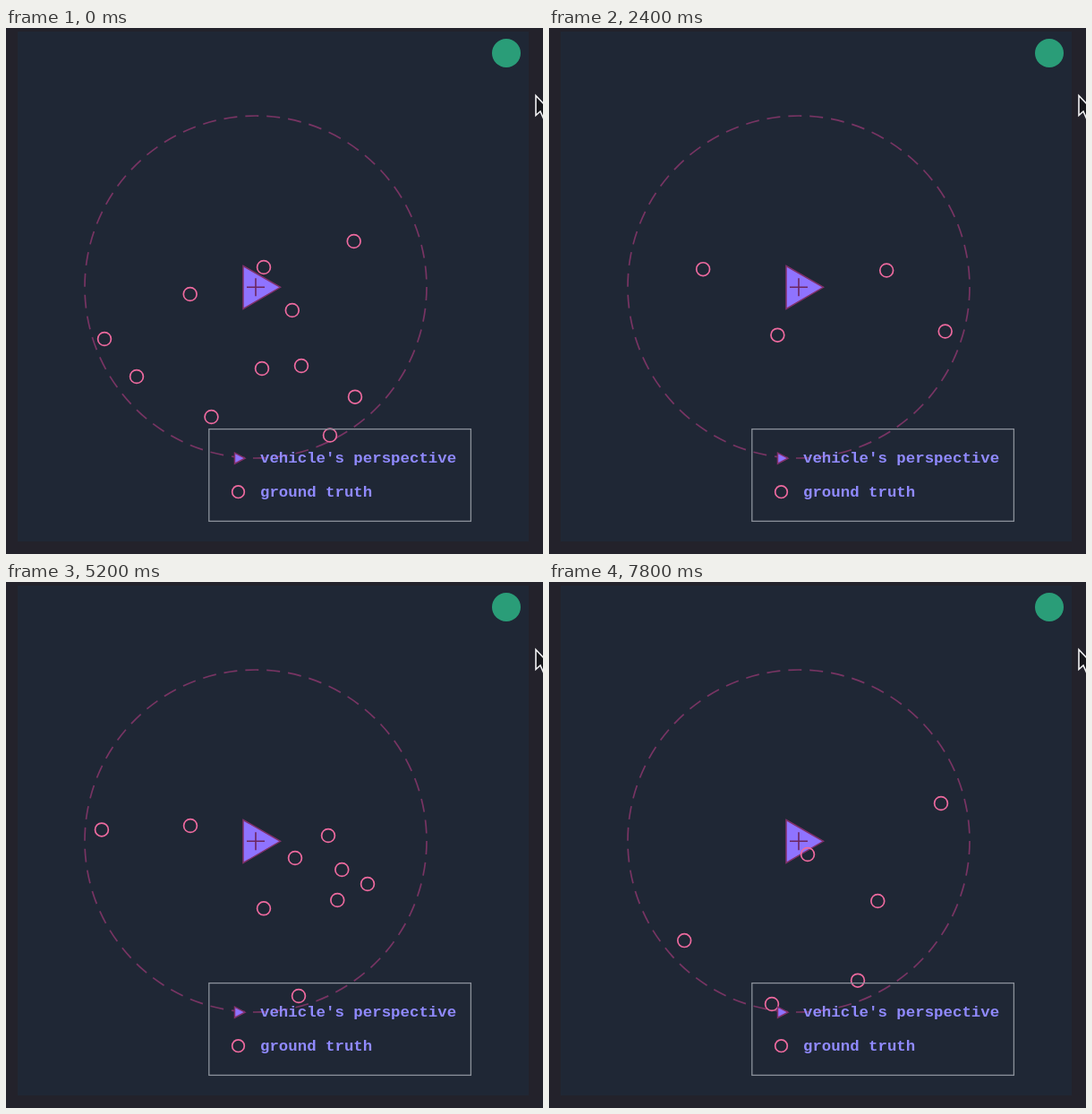
An HTML page that plays this animation: 600x587 px, repeating every 8 s.

```html
<!DOCTYPE html>
<html lang="en">
<head>
<meta charset="utf-8">
<title>Vehicle's perspective</title>
<style>
  html, body { margin: 0; width: 100%; height: 100%; overflow: hidden; background: #1f2735; }
  svg { display: block; width: 100vw; height: 100vh; }
  text { font: bold 17.4px "Courier New", "Liberation Mono", monospace; fill: #908aff; }
  .mark { fill: none; stroke: #ee6a9f; stroke-width: 1.7; }
  .vehicle { fill: #8f73ff; stroke: #80306a; stroke-width: 1.5; }
</style>
</head>
<body>
<svg viewBox="0 0 600 587" preserveAspectRatio="none">
  <rect width="600" height="587" fill="#23222b"/>
  <rect x="13" y="4" width="571" height="569" fill="#1f2735"/>
  <circle cx="559" cy="28" r="16" fill="#2a9d78"/>
  <circle cx="279" cy="289" r="191" fill="none" stroke="#783463" stroke-width="1.7" stroke-dasharray="15 9"/>
  <path class="vehicle" d="M265 265.5L306.5 289.3L265 313.5Z"/>
  <path d="M269 289.3H289M279 279.3V299.3" stroke="#6d2660" stroke-width="1.6"/>
  <g id="marks"></g>
  <rect x="226.8" y="447.6" width="292.6" height="102.8" fill="none" stroke="#8b919b" stroke-width="1.3"/>
  <path class="vehicle" d="M255.5 474.2L267 480.2L255.5 486.2Z"/>
  <circle class="mark" cx="259.5" cy="517.7" r="6.8"/>
  <text x="284" y="485">vehicle's perspective</text>
  <text x="284" y="522.5">ground truth</text>
  <path d="M592 75.5V97.5L597 93L601 102H606V90Z" fill="#15151a" stroke="#f2f2f4" stroke-width="1.6"/>
</svg>
<script>
const LOOP = 8000, STEP = 200, RANGE = 193.5;
const CENTER = { x: 279, y: 289 };

const linear = u => u;
// Brakes to a halt, waits one step, then pulls away again.
const pause = u => {
  const n = u * 9;
  return n <= 4 ? 0.5 * (1 - (1 - n / 4) ** 2)
                : 0.5 + 0.5 * (Math.max(0, n - 5) / 4) ** 2;
};
const speedUp = u => 0.85 * u + 0.15 * u * u;

// How the surroundings turn (degrees) and shift during each leg of the drive.
const legs = [
  { steps: 9, turn: 12.5, x: -95.7, y: 6.2, ease: pause },
  { steps: 7, turn: 0.001, x: -330, y: 0, ease: speedUp },
  { steps: 4, turn: 0.001, x: -212.5, y: 0, ease: linear },
  { steps: 6, turn: -5, x: -305.6, y: 15.7, ease: linear },
  { steps: 8, turn: -158.5, x: -35, y: 185.5, ease: linear },
  { steps: 5, turn: 3, x: -269.7, y: -13.6, ease: linear }
];
for (const leg of legs) {
  leg.angle = leg.turn * Math.PI / 180;
  const cot = 1 / Math.tan(leg.angle / 2);
  leg.cx = (leg.x - cot * leg.y) / 2;
  leg.cy = (leg.y + cot * leg.x) / 2;
}

// Landmarks relative to the vehicle at the start of each leg.
const groups = [
  [[109.7, -51], [9, -22], [-73.3, 8], [40.8, 26], [-169, 58], [-133, 100],
   [7, 91], [51, 88], [111, 122.7], [-49.5, 145], [83, 165.5]],
  [[105.7, 53.7], [20.7, 190.7]],
  [[-102.5, -18.5], [51, -19.5], [-37, 49.5], [143.3, 49], [85.7, 136]],
  [[8.3, -23], [33, -18.5], [135.5, -16.5], [94, 63.7], [1.3, 151]],
  [[-73, -17], [44, 19], [81, -6], [96.3, 32], [125, 48], [91.3, 66],
   [9, 75.3], [48, 173], [-145.4, 130.8]],
  [],
  [[159, -42], [10, 15], [88.3, 67], [66, 155.7], [-30, 182]]
];

const layer = document.getElementById("marks");
const marks = groups.flatMap((points, start) => points.map(point => {
  const node = document.createElementNS("http://www.w3.org/2000/svg", "circle");
  node.setAttribute("class", "mark");
  node.setAttribute("r", 7.4);
  layer.append(node);
  return { node, point, start };
}));

const clamp = v => Math.min(1, Math.max(0, v));

function drive([x, y], leg, amount) {
  const c = Math.cos(leg.angle * amount), s = Math.sin(leg.angle * amount);
  const dx = x - leg.cx, dy = y - leg.cy;
  return [leg.cx + c * dx - s * dy, leg.cy + s * dx + c * dy];
}

function progressAt(time) {
  let n = Math.floor(time / STEP);
  for (let i = 0; i < legs.length; i++) {
    const { steps, ease } = legs[i];
    if (n < steps) return i + ease(n / steps);
    n -= steps;
  }
  return legs.length;
}

function locate(point, start, progress) {
  for (let i = start; i < progress; i++) point = drive(point, legs[i], clamp(progress - i));
  for (let i = start - 1; i + 1 > progress; i--) point = drive(point, legs[i], -clamp(i + 1 - progress));
  return point;
}

function render(time) {
  const progress = progressAt(time % LOOP);
  for (const { node, point, start } of marks) {
    const [x, y] = locate(point, start, progress);
    const nearby = progress >= start - 1 && progress <= start + 2;
    const seen = nearby && Math.hypot(x, y) < RANGE;
    node.setAttribute("visibility", seen ? "visible" : "hidden");
    node.setAttribute("cx", (CENTER.x + x).toFixed(2));
    node.setAttribute("cy", (CENTER.y + y).toFixed(2));
  }
}

const begin = performance.now();
function tick() {
  render(performance.now() - begin);
  requestAnimationFrame(tick);
}
tick();
</script>
</body>
</html>
```
